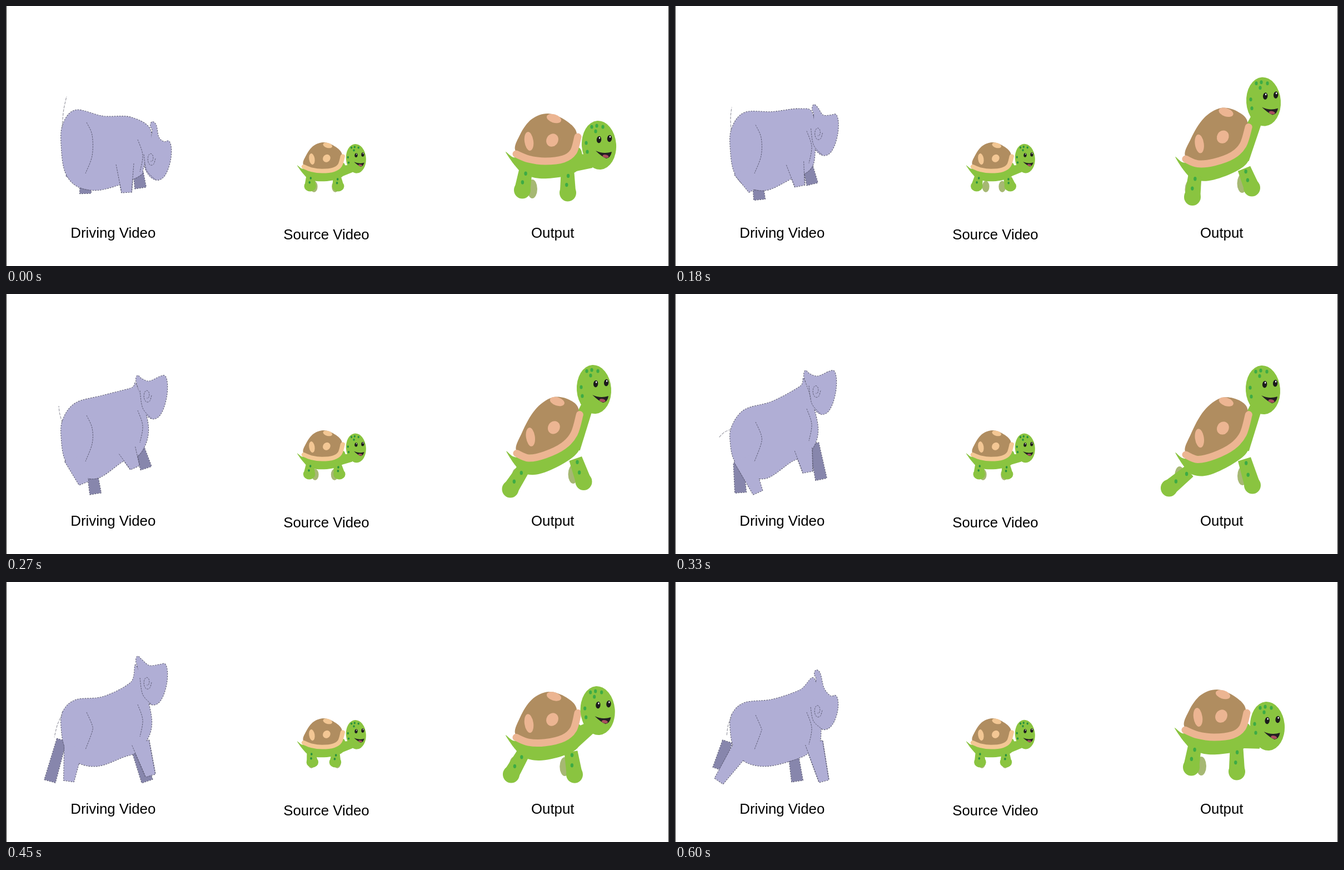
Animation, 1193 px wide and 469 px high, one loop 0.63 s. Source, as an HTML page:

```html
<!DOCTYPE html>
<html lang="en">
<head>
<meta charset="utf-8">
<title>Motion transfer</title>
<style>
html, body { margin: 0; width: 100%; height: 100%; overflow: hidden; background: #fff; }
svg { display: block; width: 100vw; height: 100vh; }
text { font: 25.8px "Liberation Sans", Arial, sans-serif; fill: #000; }
</style>
</head>
<body>
<svg viewBox="0 0 1193 469">
  <rect width="1193" height="469" fill="#fff"/>
  <g id="stage"></g>
  <path d="M.5 0V469M1192.5 0V469" stroke="#2a2a2a" fill="none"/>
  <text x="116.3" y="418">Driving Video</text>
  <text x="499.3" y="420.5">Source Video</text>
  <text x="945" y="418">Output</text>
</svg>
<script>
const LOOP = 630, STEPS = 16, TICK = 30;
const GREEN = '#8ac440', OLIVE = '#a6b873', SHELL = '#b08d60';
const LILAC = '#b0aed5', SHADE = '#8786ac', INK = '#5d5c76';

const clamp = (v, lo, hi) => Math.max(lo, Math.min(hi, v));
const lerp = (a, b, t) => a + (b - a) * t;
const mix = (a, b, t) => a.map((v, i) => lerp(v, b[i], t));

// Smooth curve through points [x, y]
function curve(p, closed = true) {
  const n = p.length;
  const at = i => p[closed ? (i + n) % n : clamp(i, 0, n - 1)];
  let d = `M${p[0]}`;
  for (let i = 0; i < (closed ? n : n - 1); i++) {
    const c = [0, 1].map(k => at(i)[k] + (at(i + 1)[k] - at(i - 1)[k]) / 6);
    const e = [0, 1].map(k => at(i + 1)[k] - (at(i + 2)[k] - at(i)[k]) / 6);
    d += `C${c} ${e} ${at(i + 1)}`;
  }
  return d + (closed ? 'Z' : '');
}
// Four corners of a straight tapered limb
function limb(x, y, u, v, w0, w1) {
  const len = Math.hypot(u - x, v - y), nx = (v - y) / len / 2, ny = (x - u) / len / 2;
  return [[x - nx * w0, y - ny * w0], [u - nx * w1, v - ny * w1],
    [u + nx * w1, v + ny * w1], [x + nx * w0, y + ny * w0]];
}
const poly = p => `M${p.join('L')}Z`;
const path = (d, fill, more = '') => `<path d="${d}" fill="${fill}" ${more}/>`;
const oval = (x, y, rx, ry, fill, turn = 0) =>
  `<ellipse rx="${rx}" ry="${ry}" fill="${fill}" transform="translate(${x} ${y}) rotate(${turn})"/>`;

// Hippo: back heights, belly front, chest, nose + muzzle height, ear, then legs (hip to foot) and tail tip
const graze = [215, 188, 199, 201, 320, 247, 292, 290, 244, .95, 263, 209,
  142, 322, 214, 285, 217, 336, 142, 305, 143, 338, 238, 300, 242, 328, 109, 163];
const lift = [228, 197, 183, 170, 302, 256, 240, 283, 148, 1.05, 237, 147,
  140, 341, 218, 282, 232, 313, 154, 315, 161, 360, 240, 278, 252, 314, 95, 202];
const rear = [240, 209, 194, 167, 302, 257, 240, 283, 139, 1.06, 235, 138,
  149, 358, 231, 280, 239, 321, 114, 305, 118, 358, 250, 270, 263, 334, 79, 259];
const stride = [235, 213, 207, 181, 316, 262, 250, 283, 148, 1, 237, 134,
  113, 359, 242, 290, 260, 349, 100, 285, 79, 359, 234, 300, 254, 359, 87, 280];
const land = [240, 218, 212, 195, 322, 262, 280, 286, 205, .83, 254, 159,
  79, 359, 250, 290, 268, 359, 94, 288, 78, 337, 213, 312, 220, 359, 93, 278];
const HIPPO = [graze, mix(graze, lift, .5), lift, rear, stride, land];

function hippo(pose) {
  const [b0, b1, b2, b3, belly, cx, cy, nx, ny, s, ex, ey, hx, hy, ...rest] = pose;
  const front = rest.slice(0, 4), farHind = rest.slice(4, 8), farFront = rest.slice(8, 12), tail = rest.slice(12);
  const face = (x, y) => [nx + x, ny + y * s];
  const torso = curve([[102, b0], [125, b1], [175, b2], [225, b3], [ex - 2, ey + 18], [cx, cy],
    [242, belly - 15], [210, belly], [165, 332], [128, 325], [107, 300], [100, (b0 + 300) / 2]]);
  const head = curve([[ex, ey + 20], [ex - 3, ey + 8], [ex, ey], [ex + 7, ey + 6],
    [(ex + nx) / 2 - 2, (ey + ny) / 2 + 10], face(-6, 1), face(3, 0), face(7, 13), face(6, 34),
    face(0, 56), face(-9, 70), face(-21, 73), face(-34, 62), face(-40, 40)]);
  const paw = limb(...front, 32, 18);
  const near = [torso, head, poly(limb(122, 296, hx, hy, 34, 18)), poly(paw)];
  const far = [farHind, farFront].map(l => poly(limb(...l, 17, 20)));

  const edge = `stroke="${INK}" stroke-width="2" stroke-linejoin="round" stroke-dasharray="3 1.5"`;
  const thin = `stroke="${INK}" stroke-dasharray="3 1.5"`;
  const layer = (parts, fill) =>
    parts.map(d => path(d, 'none', edge)).join('') + parts.map(d => path(d, fill)).join('');
  const crease = p => path(curve(p, false), 'none', thin);
  const swirl = Array.from({ length: 10 }, (_, i) =>
    [nx - 29 + (8 - i * .6) * Math.cos(i * .9), ny + 38 * s - 15 + (14 - i) * Math.sin(i * .9) + 10]);

  return layer(far, SHADE) + layer(near, LILAC) +
    crease([[145, b1 + 22], [155, b1 + 45], [155, 270], [143, 302]]) +
    crease([[237, b3 + 40], [246, b3 + 68], [241, b3 + 98]]) +
    crease([face(-42, 25), face(-37, 55), face(-21, 73)]) +
    crease(paw.slice(2).reverse()) + crease(paw.slice(0, 2)) + crease(swirl) +
    path(curve([[101, b0 + 4], [(98 + tail[0]) / 2, (b0 + tail[1]) / 2], tail], false), 'none',
      'stroke="#9a9aa4" stroke-width="1.2" stroke-dasharray="5 2"');
}

// Turtle: one rig for both. left and right are the heights of the two rim ends.
const DOME = [[918, 263], [925, 232], [946, 204], [976, 194], [1008, 207], [1027, 230], [1016, 266], [965, 276]];
const RIM = [[918, 267], [940, 276], [970, 280], [1003, 276], [1021, 263], [1029, 236]];
const BODY = [[899, 263], [913, 273], [930, 270], [1000, 265], [1030, 255], [1037, 275],
  [1028, 297], [1000, 308], [960, 311], [932, 303], [916, 288]];
const FRECKLES = [[-13, -33], [-4, -35], [7, -33], [-6, -25], [-23, -4], [-21, 12]];

function turtle([left, right, hx, hy, ...feet], { tan, dot, paw, skull }) {
  const dl = left - 262, dr = right - 230;
  const warp = ([x, y]) => {
    const g = clamp((y - 235) / 45, -1, 1);
    const w = clamp((x - 918) / 112 - g / 5, 0, 1);
    return [x - dr * .18 * (1 - g), y + lerp(dl, dr, w)];
  };
  const bend = p => p.map(warp);
  const patch = (p, rx, ry, turn) => oval(...warp(p), rx, ry, tan, turn);
  const leg = (hipX, hipY, swing, x, y) => {
    const hip = [lerp(hipX, x, swing), warp([hipX, hipY])[1]];
    const spot = (t, dx) => oval(lerp(hip[0], x, t) + dx, lerp(hip[1], y, t), 2.7, 3.7, dot);
    return path(poly(limb(...hip, x, y, 24, paw * 1.9)), GREEN) + oval(x, y, paw, 15.5, GREEN) +
      `<g>${spot(.15, 1)}${spot(.6, -2)}</g>`;
  };
  const turn = (251 - hy) * .04;
  const eye = (x, y) => oval(x, y, 4.2, 6.2, '#1c1a1c', 6) + oval(x + 1, y - 3, 1.2, 1.7, '#fff');
  const [ax, ay, bx, by, cx, cy, dx, dy] = feet;

  return oval(cx, cy, paw * .6, 17, OLIVE) + oval(dx, dy, paw * .6, 17, OLIVE) +
    path(curve(bend(BODY)), GREEN) +
    path(poly(limb(...warp([1016, 282]), hx - 12, hy + 30, 36, 22)), GREEN) +
    leg(937, 297, .25, ax, ay) + leg(1010, 301, .5, bx, by) +
    path(curve(bend(DOME)), SHELL) +
    patch([986, 203], 13.5, 7.5, 18) + patch([941, 244], 8, 17, -8) + patch([983, 242], 10.5, 12, 30) +
    path(curve(bend(RIM), false), 'none', `stroke="${tan}" stroke-width="13" stroke-linecap="round"`) +
    oval(hx, hy, skull, 44, GREEN, -4) + `<g transform="translate(${hx + turn} ${hy})">` +
    FRECKLES.map(([x, y]) => oval(x - turn, y, 2.6, 3.5, dot)).join('') + eye(0, -10) + eye(19, -12) +
    path('M-6 10Q8 17 23 12Q21 23 13 24Q4 20-6 10Z', '#231f22') + oval(12, 20, 5.5, 2.8, '#a9505f', 10) + '</g>';
}

// [step, rim left, rim right, head, hind foot, front foot, far hind foot, far front foot]
const stand = [262, 230, 1067, 251, 929, 332, 1011, 337, 947, 330, 1010, 330];
const rest = [262, 230, 1066, 260, 929, 334, 1011, 342, 947, 332, 1010, 333];
const POSES = [
  [0, ...stand],
  [2, 262, 213, 1060, 174, 936, 335, 1036, 324, 924, 327, 1021, 318],
  [6, 280, 211, 1058, 171, 926, 354, 1040, 332, 929, 335, 1020, 322],
  [8, 285, 211, 1058, 173, 889, 350, 1039, 345, 908, 328, 1021, 328],
  [10, 282, 230, 1064, 219, 896, 349, 1029, 348, 911, 332, 1003, 333],
  [13, 262, 230, 1066, 258, 935, 343, 1011, 346, 921, 333, 1010, 333],
  [14, ...rest], [15, ...rest], [STEPS, ...stand]
];
function output(k) {
  const i = POSES.findIndex(p => p[0] > k);
  const [a, ...from] = POSES[i - 1], [b, ...to] = POSES[i];
  return mix(from, to, (k - a) / (b - a));
}
function walk(k) {
  const sway = Math.cos((k - 4) / STEPS * 2 * Math.PI);
  const nod = Math.cos((k - 7.6) / 11 * 2 * Math.PI);
  return [262, 230, 1067, 244 + 3.3 * nod, 936 - 7 * sway, 326, 1016 + 9 * sway, 326,
    947 + 8 * sway, 327, 1008 - 6 * sway, 327];
}
const BIG = { tan: '#ecb592', dot: '#3dab45', paw: 15, skull: 31 };
const SMALL = { tan: '#f3c794', dot: '#27913f', paw: 17, skull: 28.5 };

const stage = document.getElementById('stage');
const begin = performance.now();
// Steps start on the nearest whole tick
const starts = Array.from({ length: STEPS }, (_, k) => Math.round(k * (LOOP / STEPS - .2) / TICK) * TICK);
let shown = -1;
function draw() {
  const t = (performance.now() - begin) % LOOP;
  const k = starts.filter(s => s <= t).length - 1;
  if (k !== shown) {
    shown = k;
    stage.innerHTML = hippo(HIPPO[Math.floor(k * HIPPO.length / STEPS + .01)]) +
      `<g transform="translate(-42.4 129.6) scale(.63 .6)">${turtle(walk(k), SMALL)}</g>` +
      turtle(output(k), BIG);
  }
  requestAnimationFrame(draw);
}
draw();
</script>
</body>
</html>
```
